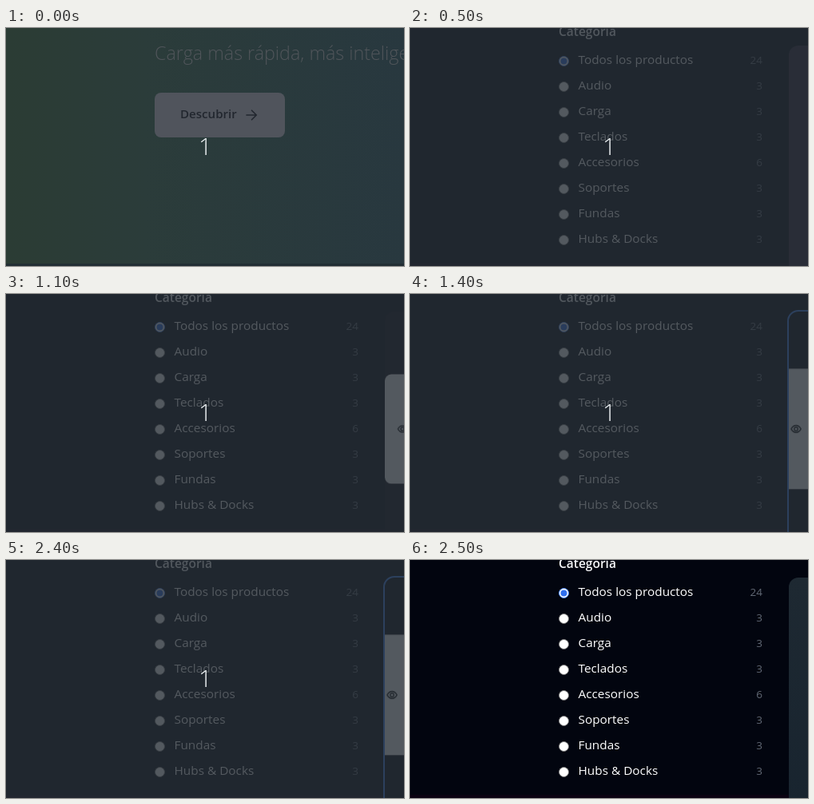
Recreate the animation shown at these times as an HTML page. Size 498 by 298 pixels, loop 8000 ms.

```html
<!DOCTYPE html>
<html lang="es">
<head>
<meta charset="utf-8">
<title>Tienda</title>
<style>
  html, body { margin: 0; width: 100%; height: 100%; overflow: hidden; background: #02050f; }
  svg { display: block; width: 498px; height: 298px; font-family: "Open Sans", "Noto Sans", sans-serif; }

  .hero, .dim, .digit, .panel, .hover, .ring, .zoom { animation: 8s step-end infinite; }
  .hero { animation-name: hero; }
  .dim, .digit { animation-name: dim; }
  .panel { animation-name: panel; }
  .hover { animation-name: hover; }
  .ring { animation-name: ring; }
  .zoom { animation-name: zoom; transform-origin: 626px 169px; }

  @keyframes hero { 0% { opacity: 1; } 6.25%, 100% { opacity: 0; } }
  @keyframes dim { 0% { opacity: 1; } 31.25%, 100% { opacity: 0; } }
  @keyframes panel {
    0% { fill: #2d2338; }
    13.75% { fill: #0c0813; }
    15% { fill: #070710; }
    16.25% { fill: #04060f; }
    17.5% { fill: #02050f; }
    31.25%, 100% { fill: url(#slate); }
  }
  @keyframes hover { 0% { opacity: 0; } 13.75% { opacity: 1; } 31.25%, 100% { opacity: 0; } }
  @keyframes ring { 0% { opacity: 0; } 15% { opacity: .5; } 16.25% { opacity: .85; } 17.5%, 100% { opacity: 1; } }
  @keyframes zoom {
    0% { transform: scale(1); }
    15% { transform: scale(1.05); }
    16.25% { transform: scale(1.085); }
    17.5%, 100% { transform: scale(1.1); }
  }

  .name { font-size: 15.35px; fill: #fff; }
  .count { font-size: 13.5px; fill: #626975; text-anchor: end; }
</style>
</head>
<body>
<svg viewBox="0 0 498 298">
  <defs>
    <linearGradient id="slate" x1="0" y1="0" x2="0" y2="1">
      <stop offset="0" stop-color="#1e2932"/>
      <stop offset="1" stop-color="#18242f"/>
    </linearGradient>
    <linearGradient id="sea">
      <stop offset="0" stop-color="#2b3c34"/>
      <stop offset=".35" stop-color="#2b3c3a"/>
      <stop offset="1" stop-color="#28383f"/>
    </linearGradient>
    <clipPath id="card"><rect x="474" y="22" width="304" height="300" rx="12"/></clipPath>
  </defs>

  <!-- product list -->
  <rect width="498" height="298" fill="#02050f"/>
  <rect y="294" width="498" height="4" fill="#0b0312"/>
  <text x="186" y="10" font-size="15.5" font-weight="600" fill="#f4f5f7">Categoría</text>
  <g id="list"></g>

  <rect class="panel" x="474" y="22" width="304" height="300" rx="12"/>
  <g class="hover">
    <g clip-path="url(#card)">
      <g class="zoom">
        <rect x="474" y="100.5" width="304" height="137" rx="8" fill="#fff"/>
        <g fill="none" stroke="#000" stroke-width="1.2">
          <path d="M490.5 169C493 163.7 499 163.7 501.5 169C499 174.3 493 174.3 490.5 169Z"/>
          <circle cx="496" cy="169" r="2"/>
        </g>
      </g>
    </g>
    <rect class="ring" x="473" y="21" width="306" height="302" rx="13" fill="none" stroke="#3b82f6" stroke-width="2"/>
  </g>
  <rect class="dim" width="498" height="298" fill="#283037" fill-opacity=".8"/>

  <!-- banner -->
  <g class="hero">
    <rect width="498" height="298" fill="url(#sea)"/>
    <rect y="295" width="498" height="3" fill="#222e34"/>
    <text x="186" y="40" font-size="23.3" font-weight="300" fill="#50555a">Carga más rápida, más inteligente</text>
    <rect x="186" y="81" width="163" height="56" rx="8" fill="#50545c"/>
    <text x="218" y="113" font-size="15.1" font-weight="600" fill="#22272f">Descubrir</text>
    <path d="M301 109H313M307.5 103.2L313.3 109L307.5 114.8" fill="none" stroke="#22272f" stroke-width="1.6" stroke-linecap="round" stroke-linejoin="round"/>
  </g>

  <text class="digit" x="241" y="159" font-size="29.5" font-weight="300" fill="#f2f6f8">1</text>
</svg>
<script>
  const rows = [
    ["Todos los productos", 24], ["Audio", 3], ["Carga", 3], ["Teclados", 3],
    ["Accesorios", 6], ["Soportes", 3], ["Fundas", 3], ["Hubs &amp; Docks", 3]
  ];

  const radio = (y, on) => on
    ? `<circle cx="192.5" cy="${y}" r="6" fill="#fff" stroke="#4d8dff"/>
       <circle cx="192.5" cy="${y}" r="4" fill="#2f6fee"/>`
    : `<circle cx="192.5" cy="${y}" r="6" fill="#fff" stroke="#767676"/>`;

  document.getElementById("list").innerHTML = rows.map(([name, count], i) => {
    const y = 45 + 32 * i;
    return radio(y - 3.5, i === 0) +
      `<text class="name" x="210.5" y="${y}">${name}</text>
       <text class="count" x="441" y="${y}">${count}</text>`;
  }).join("");
</script>
</body>
</html>
```
